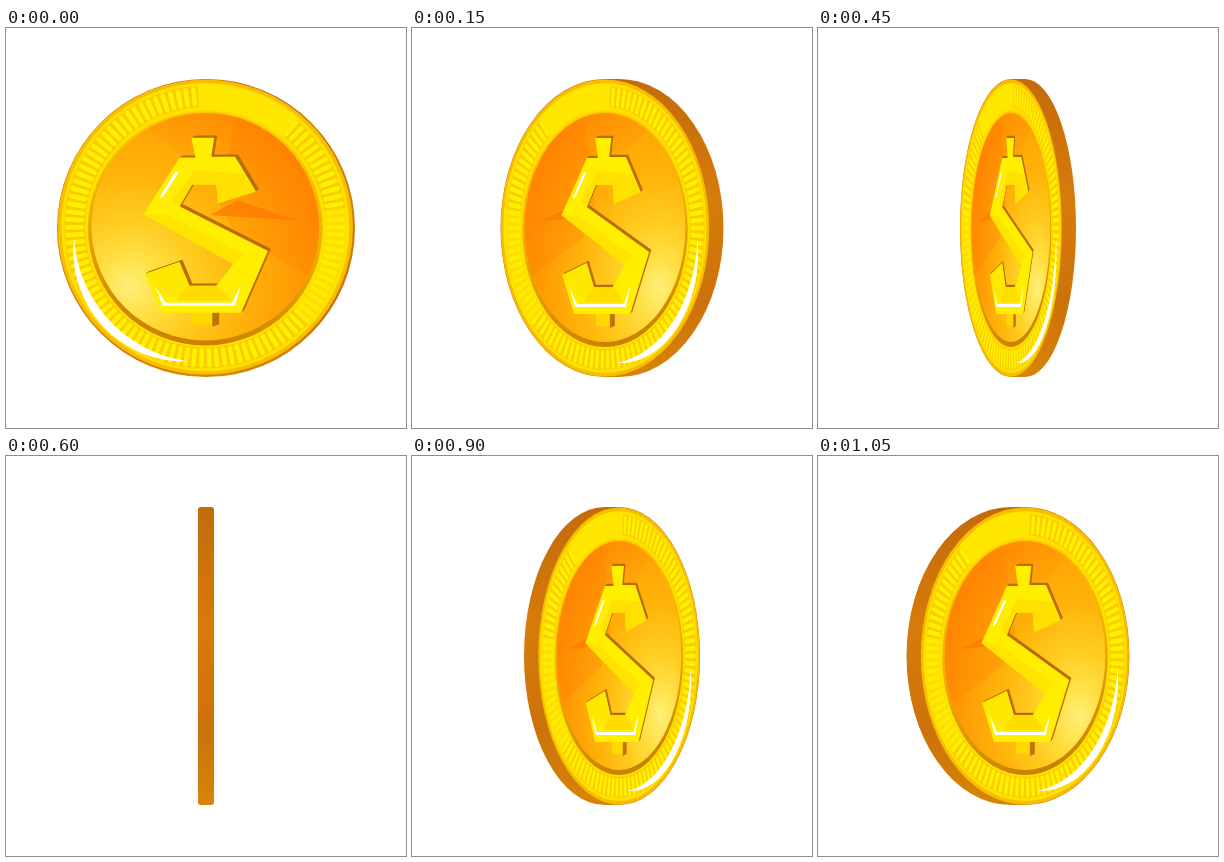
These frames come from a looping animation (400x400 px, 1.2 s). An HTML page:

```html
<!DOCTYPE html>
<html lang="en">
<head>
<meta charset="utf-8">
<title>Spinning coin</title>
<style>
  html, body { margin: 0; width: 100%; height: 100%; overflow: hidden; background: #fff; }
  svg { display: block; width: 100%; height: 100%; }
</style>
</head>
<body>
<svg viewBox="0 0 400 400">
  <defs>
    <linearGradient id="edge" x1="0" y1="0" x2="0" y2="1">
      <stop offset="0" stop-color="#c46a0a"/>
      <stop offset=".4" stop-color="#d67c0a"/>
      <stop offset=".75" stop-color="#cc720a"/>
      <stop offset="1" stop-color="#d88408"/>
    </linearGradient>
    <linearGradient id="groove" x1=".6" y1="0" x2=".4" y2="1">
      <stop offset="0" stop-color="#ffcc00"/>
      <stop offset=".5" stop-color="#efae00"/>
      <stop offset="1" stop-color="#c98000"/>
    </linearGradient>
    <radialGradient id="glow" gradientUnits="userSpaceOnUse" cx="124" cy="260" r="225">
      <stop offset="0" stop-color="#fff07a"/>
      <stop offset=".14" stop-color="#ffe044"/>
      <stop offset=".3" stop-color="#ffcc20"/>
      <stop offset=".5" stop-color="#ffb40a"/>
      <stop offset=".75" stop-color="#ff9a04"/>
      <stop offset="1" stop-color="#ff8000"/>
    </radialGradient>
    <clipPath id="disc"><circle cx="200" cy="199.5" r="114.5"/></clipPath>
  </defs>

  <rect id="body" y="51" height="298" fill="url(#edge)"/>

  <g id="face">
    <g id="plate">
      <circle cx="200" cy="200" r="148.5" fill="#f6be00"/>
      <circle cx="200" cy="200" r="145" fill="#ffe000"/>
      <circle cx="200" cy="200" r="131.5" fill="none" stroke="#fbcb00" stroke-width="21"/>
      <path id="ticks" fill="none" stroke="#fff000" stroke-width="4.6" stroke-linecap="round"/>
      <g fill="none" stroke="#ffe800" stroke-width="24">
        <path id="sheenTop" opacity=".9"/>
        <path id="sheenSide" opacity=".6"/>
      </g>
      <circle cx="200" cy="201" r="118" fill="url(#groove)"/>
      <circle cx="200" cy="199.5" r="114.5" fill="url(#glow)"/>
      <g clip-path="url(#disc)">
        <path d="M236 60 H330 V262 L232 210 L214 176 Z" fill="#ff7a00" opacity=".25"/>
        <path d="M190 140 L106 134 L136 96 Z" fill="#ffc400" opacity=".15"/>
        <path d="M232 173 L292 193 L205 188 Z" fill="#ff7a00" opacity=".75"/>
      </g>
      <path d="M68 211 A111 111 0 0 0 183 335 A133 133 0 0 1 68 211 Z" fill="#fff"/>
    </g>

    <g id="sign">
      <path d="M187 282 H214 V298 H187 Z" fill="#ffd800"/>
      <path d="M207 284 H214 V298 L207 300 Z" fill="#c07408"/>
      <g id="depth" fill="#b96c08"></g>
      <path id="front" fill="#ffee00"/>
      <path d="M189 143 L238 146 L250 164 L213 176 L211 157 L187 157 L174 179 L166 174 Z" fill="#ffe000"/>
      <path d="M138 187 L160 187 L240 228 L228 237 Z" fill="#ffe400"/>
      <path d="M139 247 L174 235 L184 259 L172 270 L158 270 Z" fill="#ffe800"/>
      <path d="M184 259 H211 L222 268 L226 274 H172 L174 268 Z" fill="#ffdc00"/>
      <path d="M170 144 L154 170 L157 170 L173 145 Z" fill="#fff"/>
      <path d="M150 260 L160 276 H227 L236 258 L230 279 H157 Z" fill="#fff"/>
    </g>
  </g>
</svg>
<script>
const $ = id => document.getElementById(id);
const STEP = 150, LOOP = 1200, R = 149, THICK = 14;

// Half width of the face and the side its edge shows on (1 = right).
const poses = [[149, 0], [104.5, 1], [81, 1], [51, 1], [0, 0], [51, -1], [81, -1], [104.5, -1]];

const polar = (r, deg) => {
  const a = deg * Math.PI / 180;
  return `${(200 + r * Math.cos(a)).toFixed(2)} ${(200 + r * Math.sin(a)).toFixed(2)}`;
};
const arc = (from, to) => `M${polar(131.5, from)} A131.5 131.5 0 0 1 ${polar(131.5, to)}`;

const TICKS = 110;
let ridges = '';
for (let i = 0; i < TICKS; i++) {
  const deg = i * 360 / TICKS;
  ridges += `M${polar(124, deg)}L${polar(139, deg)}`;
}
$('ticks').setAttribute('d', ridges);
$('sheenTop').setAttribute('d', arc(-93, -50));
$('sheenSide').setAttribute('d', arc(-8, 42));

const dollar = 'M174 130 L190 130 L186 110 H209 L206 129 H230 L251 164 L213 176 L211 157 H187 ' +
  'L174 179 L263 224 L236 286 H156 L139 247 L174 235 L184 259 H211 L228 237 L138 187 Z';
$('front').setAttribute('d', dollar);
$('depth').innerHTML = [3, 2, 1].map(n =>
  `<path d="${dollar}" transform="translate(${n} ${-n * .75})"/>`).join('');

function draw(time) {
  const [rx, side] = poses[Math.floor(time % LOOP / STEP)];
  const flat = rx === R, thin = rx === 0;
  const width = flat ? 2 * R : thin ? 16 : 2 * rx + THICK;
  const body = $('body');
  body.setAttribute('x', 200 - width / 2);
  body.setAttribute('width', width);
  body.setAttribute('rx', thin ? 3 : rx);
  body.setAttribute('ry', thin ? 3 : R);

  $('face').style.display = thin ? 'none' : '';
  const scale = flat ? .994 : rx / R;
  const cx = flat ? 199.3 : 200 - side * THICK / 2;
  const cy = flat ? 199.2 : 200;
  $('face').setAttribute('transform',
    `translate(${cx} ${cy}) scale(${scale} ${flat ? scale : 1}) translate(-200 -200)`);
  $('plate').setAttribute('transform', flat ? '' : 'translate(400 0) scale(-1 1)');
}

const start = performance.now();
function tick() {
  draw(performance.now() - start);
  requestAnimationFrame(tick);
}
draw(0);
requestAnimationFrame(tick);
</script>
</body>
</html>
```
